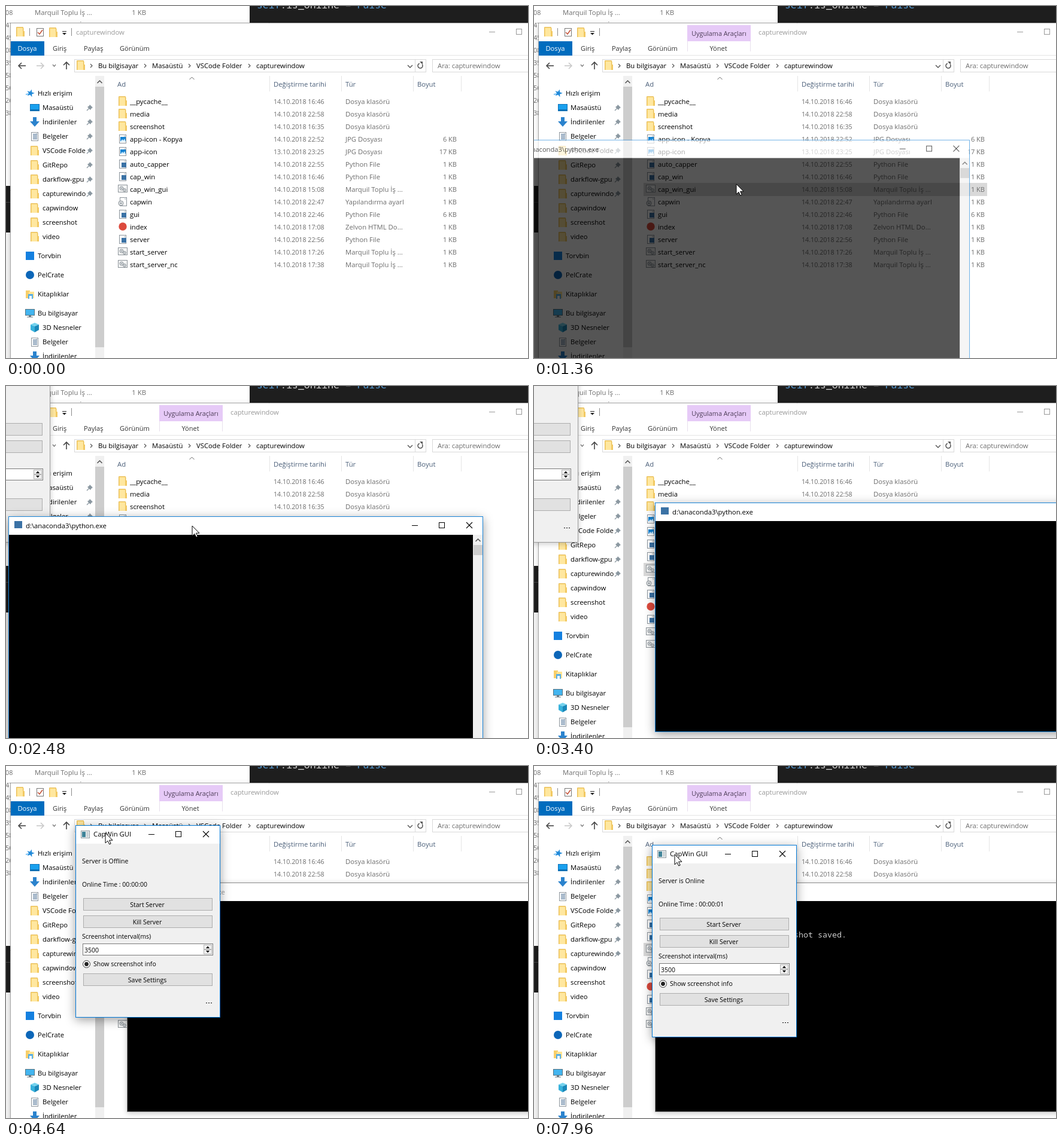
These frames come from a looping animation (872 by 589 pixels, 8 s). An HTML page with a canvas:

```html
<!DOCTYPE html>
<html lang="tr">
<head>
<meta charset="utf-8">
<title>CapWin GUI</title>
<style>
html, body { margin: 0; width: 100%; height: 100%; overflow: hidden; background: #fff; }
canvas { display: block; }
</style>
</head>
<body>
<canvas id="stage" width="872" height="589"></canvas>
<script>
const ctx = document.getElementById('stage').getContext('2d');
const W = 872, H = 589, LOOP = 8000, STEP = 40;
const SANS = '"Open Sans", "Noto Sans", sans-serif';
const MONO = '"Noto Sans Mono", "DejaVu Sans Mono", monospace';
const GRAY = '#6d6d6d', BLUE = '#0078d7';

// Pointer path: time, x, y
const PATH = [
  [200, 330, 600], [600, 345, 335], [760, 340, 287], [920, 338, 298], [1520, 338, 298],
  [2040, 248, 237], [2200, 248, 237], [2480, 311, 234], [2720, 509, 211], [3000, -118, -47],
  [3440, -118, -47], [4200, 123, 89], [4260, 123, 89], [4400, 166, 112], [4640, 166, 112],
  [4800, 247, 145], [5080, 247, 145], [5600, 298, 267], [6080, 298, 267], [6120, 296, 270],
  [6240, 298, 268], [6400, 298, 268], [6800, 533, 433], [7200, 533, 300], [7240, 533, 300],
  [7600, 170, 120], [7920, 235, 148]
];

const BAT = 'Marquil Toplu İş ...', PY = 'Python File', DIR = 'Dosya klasörü', JPG = 'JPG Dosyası';
const FILES = [
  ['folder', '__pycache__', '14.10.2018 16:46', DIR, ''],
  ['folder', 'media', '14.10.2018 22:58', DIR, ''],
  ['folder', 'screenshot', '14.10.2018 16:35', DIR, ''],
  ['image', 'app-icon - Kopya', '14.10.2018 22:52', JPG, '6 KB'],
  ['image', 'app-icon', '13.10.2018 23:25', JPG, '17 KB'],
  ['script', 'auto_capper', '14.10.2018 22:55', PY, '1 KB'],
  ['script', 'cap_win', '14.10.2018 16:46', PY, '1 KB'],
  ['batch', 'cap_win_gui', '14.10.2018 15:08', BAT, '1 KB'],
  ['config', 'capwin', '14.10.2018 22:47', 'Yapılandırma ayarl', '1 KB'],
  ['script', 'gui', '14.10.2018 22:46', PY, '6 KB'],
  ['web', 'index', '14.10.2018 17:08', 'Zelvon HTML Do...', '1 KB'],
  ['script', 'server', '14.10.2018 22:56', PY, '1 KB'],
  ['batch', 'start_server', '14.10.2018 17:26', BAT, '1 KB'],
  ['batch', 'start_server_nc', '14.10.2018 17:38', BAT, '1 KB']
];
const CHOSEN = 7;

// icon, label, row centre, level, pinned
const PLACES = [
  ['star', 'Hızlı erişim', 146, 0], ['desktop', 'Masaüstü', 170, 1, 1],
  ['down', 'İndirilenler', 194, 1, 1], ['doc', 'Belgeler', 218, 1, 1],
  ['folder', 'VSCode Folder', 242, 1, 1], ['folder', 'GitRepo', 266, 1, 1],
  ['folder', 'darkflow-gpu', 290, 1, 1], ['folder', 'capturewindow', 314, 1, 1],
  ['folder', 'capwindow', 338, 1], ['folder', 'screenshot', 362, 1], ['folder', 'video', 386, 1],
  ['square', 'Torvbin', 418, 0], ['disc', 'PelCrate', 450, 0], ['library', 'Kitaplıklar', 482, 0],
  ['pc', 'Bu bilgisayar', 514, 0], ['cube', '3D Nesneler', 538, 1],
  ['doc', 'Belgeler', 562, 1], ['down', 'İndirilenler', 586, 1]
];

function rect(x, y, w, h, fill, stroke) {
  if (fill) { ctx.fillStyle = fill; ctx.fillRect(x, y, w, h); }
  if (stroke) {
    ctx.strokeStyle = stroke; ctx.lineWidth = 1;
    ctx.strokeRect(x + .5, y + .5, w - 1, h - 1);
  }
}
function trace(pts) {
  ctx.beginPath();
  for (let i = 0; i < pts.length; i += 2) ctx.lineTo(pts[i], pts[i + 1]);
}
function line(color, width, ...pts) {
  trace(pts); ctx.strokeStyle = color; ctx.lineWidth = width; ctx.stroke();
}
function poly(color, ...pts) { trace(pts); ctx.fillStyle = color; ctx.fill(); }
function circle(x, y, r, fill, stroke) {
  ctx.beginPath(); ctx.arc(x, y, r, 0, 7);
  if (fill) { ctx.fillStyle = fill; ctx.fill(); }
  if (stroke) { ctx.strokeStyle = stroke; ctx.lineWidth = 1; ctx.stroke(); }
}
function text(s, x, mid, color = '#000', size = 11.3, align = 'left', family = SANS) {
  ctx.font = `${size}px ${family}`;
  ctx.textAlign = align; ctx.fillStyle = color;
  ctx.fillText(s, x, mid + 4);
}
function clipped(x, y, w, h, draw) {
  ctx.save(); ctx.beginPath(); ctx.rect(x, y, w, h); ctx.clip(); draw(); ctx.restore();
}
function shadowed(x, y, w, h, fill, strong) {
  ctx.save();
  ctx.shadowColor = `rgba(0,0,0,${strong ? .38 : .22})`;
  ctx.shadowBlur = strong ? 16 : 9; ctx.shadowOffsetY = strong ? 4 : 2;
  rect(x, y, w, h, fill);
  ctx.restore();
}

function page(x, y) {
  rect(x - 6, y - 7, 12, 15, '#fff', '#8d959c');
  poly('#d5dadd', x + 2, y - 7, x + 6, y - 3, x + 2, y - 3);
}
function gear(x, y, r) {
  circle(x, y, r, '#dfe3e5', '#8a9197'); circle(x, y, r / 3, '#8a9197');
}
// Each icon is drawn around its centre
const ICONS = {
  folder(x, y) {
    rect(x - 6, y - 7, 10, 15, '#fbd775');
    rect(x - 5, y - 6, 11, 14, '#ffe79f');
    rect(x + 4, y - 1, 3, 9, '#f2c963');
    line('#e6bd5b', 1, x - 6.5, y + 8, x - 6.5, y - 7.5, x + 4.5, y - 7.5, x + 4.5, y - 1);
  },
  image(x, y) {
    page(x, y); rect(x - 4, y - 3, 9, 8, '#1583d2');
    poly('#d9efff', x - 4, y + 5, x - 1, y + 1, x + 1, y + 3, x + 3, y, x + 5, y + 5);
  },
  script(x, y) { page(x, y); rect(x - 2, y - 2, 8, 8, '#3b72a5'); },
  batch(x, y) {
    rect(x - 8, y - 7, 16, 13, '#f4f5f5', '#8b9298');
    gear(x - 2, y - 1, 3); gear(x + 3, y + 2, 2.5);
  },
  config(x, y) { page(x + 1, y); gear(x - 3, y + 3, 4); },
  web(x, y) { circle(x, y, 6.7, '#dc4a3d'); },
  star(x, y) {
    line('#7bc2f5', 2, x - 7, y + 2, x - 2, y + 1);
    ctx.beginPath();
    for (let i = 0; i < 10; i++) {
      const a = i * Math.PI / 5 - 1.3, r = i % 2 ? 2.7 : 6.8;
      ctx.lineTo(x + 1 + r * Math.cos(a), y + r * Math.sin(a));
    }
    ctx.fillStyle = '#2089d9'; ctx.fill();
  },
  desktop(x, y) { rect(x - 8, y - 6, 16, 12, '#19a0ee', '#1173b8'); rect(x - 7, y + 3, 14, 2, '#0c6fb4'); },
  down(x, y) { poly('#2b83cd', x - 3, y - 8, x + 3, y - 8, x + 3, y - 1, x + 8, y - 1, x, y + 8, x - 8, y - 1, x - 3, y - 1); },
  doc(x, y) {
    page(x, y);
    for (let i = -4; i < 6; i += 2) line('#58799b', 1, x - 3, y + i + .5, x + 4, y + i + .5);
  },
  square(x, y) { rect(x - 7, y - 7, 14, 14, '#1480e0'); },
  disc(x, y) { circle(x, y, 7, '#0c66b8'); },
  library(x, y) {
    rect(x - 7, y - 6, 7, 13, '#f8cf69'); rect(x - 2, y - 4, 9, 11, '#ffe493');
    rect(x - 3, y, 8, 8, '#56ade5'); rect(x - 1, y + 3, 4, 5, '#fff');
  },
  pc(x, y) {
    rect(x - 8, y - 7, 16, 11, '#43b5ef', '#58727f');
    rect(x - 2, y + 4, 4, 2, '#73838c'); rect(x - 5, y + 6, 10, 1, '#73838c');
  },
  cube(x, y) {
    poly('#76d3ee', x - 7, y - 5, x, y - 8, x + 7, y - 5, x, y - 2);
    poly('#38b2dc', x - 7, y - 5, x, y - 2, x, y + 8, x - 7, y + 4);
    poly('#1a88b9', x + 7, y - 5, x, y - 2, x, y + 8, x + 7, y + 4);
  }
};

function pin(x, y) {
  poly('#8b98a1', x, y - 5, x + 5, y, x + 3, y + 1, x + 1, y + 4, x - 4, y - 1, x - 1, y - 3);
  line('#8b98a1', 1.2, x - 1, y + 1, x - 5, y + 5);
}
function captionButtons(minX, maxX, closeX, mid, color) {
  rect(minX, mid, 10, 1, color);
  rect(maxX, mid - 5, 10, 10, null, color);
  if (closeX === undefined) return;
  line(color, 1.1, closeX, mid - 5, closeX + 10, mid + 5);
  line(color, 1.1, closeX + 10, mid - 5, closeX, mid + 5);
}
const chevronRight = x => line('#555', 1.2, x - 2, 97, x + 1, 100, x - 2, 103);
const chevronUp = (x, y) => line('#505050', 1.5, x - 4, y + 2, x, y - 2, x + 4, y + 2);
function arrow(x, y, dx, dy, color) {
  line(color, 1.6, x - dx * 6, y - dy * 6, x + dx * 5.5, y + dy * 5.5);
  line(color, 1.6, x + dx - dy * 5, y + dy - dx * 5, x + dx * 6, y + dy * 6, x + dx + dy * 5, y + dy + dx * 5);
}

function drawBackdrop() {
  rect(0, 0, W, H, '#fff');
  ['08', '47', '45', '08', '35', '58', '56', '26', '38'].forEach((s, i) => text(s, -1, 11 + i * 21, GRAY, 10.8));
  for (const y of [11, 32]) {
    text(BAT, 48, y, GRAY); text('1 KB', 234, y, GRAY, 11.3, 'right');
  }
  rect(407, 0, 465, 29, '#1e1e1e');
  const code = 16.43;
  text('self', 419, 0, '#569cd6', code, 'left', MONO);
  text('.is_online = ', 419 + 39.4, 0, '#d4d4d4', code, 'left', MONO);
  text('False', 419 + 167.6, 0, '#569cd6', code, 'left', MONO);
  rect(0, 301, 8, 78, '#1e1e1e');
  rect(0, 328, 8, 1, '#454545');
  rect(0, 379, 8, 210, '#f4f4f4');
}

function drawExplorer(t, mouse) {
  const opened = t >= 1040, active = opened && t < 1280;
  const caption = active ? '#000' : '#999';
  shadowed(8, 29, 880, 580, '#fff', active);
  line(active ? '#4a4a4a' : '#a6a6a6', 1, 7.5, H, 7.5, 28.5, W, 28.5);

  ICONS.folder(24, 43); rect(39, 37, 1, 13, '#8a8a8a');
  rect(51, 37, 12, 14, '#fff', '#777'); line('#c4563d', 1.6, 53, 44, 56, 47, 61, 40);
  ICONS.folder(79, 44);
  rect(94, 42, 7, 1, '#222'); poly('#222', 94, 45, 101, 45, 97.5, 48.5);
  rect(109, 37, 1, 13, '#8a8a8a');
  text('capturewindow', opened ? 375 : 117, 44, caption);
  captionButtons(807, 852, undefined, 43, caption);

  rect(8, 59, 56, 24, '#006cbe');
  text('Dosya', 35.5, 71, '#fff', 11.2, 'center');
  text('Giriş', 78, 71, '#333', 11); text('Paylaş', 130, 71, '#333', 11);
  text('Görünüm', 190, 71, '#333', 11);
  if (opened) {
    rect(256, 32, 106, 27, '#e6caf7');
    text('Uygulama Araçları', 309, 46, '#4d3d57', 10.8, 'center');
    rect(256, 59, 1, 17, '#e8e0ed'); rect(361, 59, 1, 17, '#e8e0ed');
    text('Yönet', 308, 71, '#333', 11, 'center');
  }
  rect(64, 82, 808, 1, '#e4e4e4');

  arrow(27, 100, -1, 0, '#444'); arrow(57, 100, 1, 0, '#c9c9c9'); arrow(101, 100, 0, -1, '#444');
  line('#777', 1.2, 78, 98, 80.5, 101, 83, 98);
  rect(114, 89, 588, 22, '#fff', '#d9d9d9'); rect(683, 90, 1, 20, '#d9d9d9');
  ICONS.folder(125, 99);
  [143, 233, 307, 407].forEach(chevronRight);
  text('Bu bilgisayar', 154, 100); text('Masaüstü', 244, 100);
  text('VSCode Folder', 318, 100); text('capturewindow', 418, 100);
  line('#555', 1.4, 671, 99, 675, 103, 679, 99);
  ctx.beginPath(); ctx.arc(692, 100, 4, -.6, 4.4);
  ctx.strokeStyle = '#555'; ctx.lineWidth = 1.5; ctx.stroke();
  poly('#555', 691, 93, 696, 93, 696, 98);
  rect(712, 89, 180, 22, '#fff', '#d9d9d9');
  text('Ara: capturewindow', 721, 100, GRAY);

  for (const [icon, label, y, level, pinned] of PLACES) {
    ICONS[icon](level ? 48 : 40, y);
    clipped(50, y - 12, pinned ? 83 : 98, 24, () => text(label, level ? 61 : 53, y));
    if (pinned) pin(140, y);
  }
  rect(149, 117, 15, 472, '#f0f0f0'); rect(149, 135, 15, 436, '#cdcdcd');
  chevronUp(156.5, 127);

  line('#666', 1, 306.5, 123, 310.5, 119, 314.5, 123);
  [['Ad', 186], ['Değiştirme tarihi', 447], ['Tür', 567], ['Boyut', 687]].forEach(h => text(h[0], h[1], 131, '#4c607a'));
  [440, 560, 680, 760].forEach(x => rect(x, 117, 1, 26, '#e5e5e5'));

  const hover = t < 1280 ? Math.floor((mouse.y - 149) / 21) : -1;
  FILES.forEach(([icon, name, date, kind, size], i) => {
    const y = 160 + i * 21;
    if (opened && i === CHOSEN) rect(183, y - 11, 574, 22, active ? '#cce8ff' : '#d9d9d9');
    else if (i === hover) rect(183, y - 11, 574, 22, '#e5f3ff');
    ICONS[icon](195, y - 1);
    text(name, 207, y); text(date, 447, y, GRAY, 10.7);
    text(kind, 567, y, GRAY); text(size, 753, y, GRAY, 11, 'right');
  });
}

// Fade and grow from the centre of the box
function appear(p, x, y, w, h, draw) {
  if (p <= 0) return;
  const scale = .955 + .045 * p;
  ctx.save();
  ctx.globalAlpha = p;
  ctx.translate(x + w / 2, y + h / 2); ctx.scale(scale, scale); ctx.translate(-w / 2, -h / 2);
  draw();
  ctx.restore();
}

function drawConsole(t, active, opening) {
  const w = 793, h = 384, caption = active ? '#000' : '#999';
  if (opening) line('#1883d7', 1, .5, h, .5, .5, w - .5, .5, w - .5, h);
  else shadowed(0, 0, w, h, '#fff', active);
  rect(1, 1, w - 2, 30, '#fff');
  rect(1, 31, w - 18, h - 32, '#000');
  rect(w - 17, 31, 16, h - 32, '#f0f0f0'); rect(w - 16, 48, 15, 17, '#cdcdcd');
  chevronUp(w - 8.5, 40);
  rect(10, 8, 13, 12, '#3b72a5');
  text('d:\\anaconda3\\python.exe', 29, 16, caption);
  captionButtons(674, 719, 765, 15, caption);
  if (t >= 6600) text('Screenshot saved.', 184, 88, '#ccc', 13.33, 'left', MONO);
  if (!opening) rect(0, 0, w, h, null, active ? '#1883d7' : '#8c8c8c');
}

function drawDialog(t, active) {
  const w = 242, h = 322, caption = active ? '#000' : '#999';
  const label = (s, x, mid) => text(s, x, mid, '#000', 10.5);
  const button = (s, y, fill = '#e1e1e1', edge = '#adadad') => {
    rect(13, y, 216, 21, fill, edge);
    text(s, 120, y + 11, '#000', 10.5, 'center');
  };
  shadowed(0, 0, w, h, '#f0f0f0', active);
  rect(0, 0, w, 31, '#fff');
  rect(9, 9, 15, 13, '#f2f5f6', '#8c979d'); rect(11, 11, 6, 9, '#3f8398'); rect(18, 11, 4, 9, '#cbd3d6');
  text('CapWin GUI', 30, 15, caption);
  captionButtons(122, 167, 213, 15, caption);

  const online = t >= 6520;
  label(online ? 'Server is Online' : 'Server is Offline', 11, 60);
  label('Online Time : 00:00:0' + (t >= 7520 ? 1 : 0), 11, 99);
  if (t >= 6400 && t < 6480) button('Start Server', 122, '#cce4f7', '#005499');
  else if (t >= 5560 && t < 6520) button('Start Server', 122, '#e5f1fb', BLUE);
  else button('Start Server', 122);
  button('Kill Server', 151);
  label('Screenshot interval(ms)', 11, 186);
  rect(12, 198, 218, 20, '#fff', '#7a7a7a');
  label('3500', 15, 209);
  rect(214, 200, 14, 8, '#f0f0f0', '#b5b5b5'); rect(214, 208, 14, 8, '#f0f0f0', '#b5b5b5');
  poly('#000', 218, 206, 224, 206, 221, 202.5); poly('#000', 218, 210, 224, 210, 221, 213.5);
  circle(18.5, 232.5, 6, '#fff', '#333'); circle(18.5, 232.5, 3.4, '#222');
  label('Show screenshot info', 30, 232);
  button('Save Settings', 248);
  [218, 222, 226].forEach(x => rect(x, 297, 2, 1, '#000'));
  rect(0, 0, w, h, null, active ? BLUE : '#9b9b9b');
}

function drawPointer({ x, y }) {
  trace([x, y, x, y + 17, x + 4, y + 13.3, x + 6.7, y + 19, x + 9.2, y + 18, x + 6.6, y + 12.2, x + 12, y + 12.2]);
  ctx.closePath();
  ctx.fillStyle = '#fff'; ctx.fill();
  ctx.strokeStyle = '#000'; ctx.lineWidth = 1; ctx.stroke();
}

const clamp = (v, lo, hi) => Math.min(hi, Math.max(lo, v));
function pointerAt(t) {
  t = clamp(t, PATH[0][0], PATH[PATH.length - 1][0]);
  const i = Math.max(1, PATH.findIndex(k => k[0] >= t));
  const [t0, x0, y0] = PATH[i - 1], [t1, x1, y1] = PATH[i];
  const p = (t - t0) / (t1 - t0);
  return { x: Math.round(x0 + (x1 - x0) * p), y: Math.round(y0 + (y1 - y0) * p) };
}

function render(t) {
  const mouse = pointerAt(t);
  drawBackdrop();
  drawExplorer(t, mouse);

  // A dragged box keeps its offset from the pointer
  const grabConsole = pointerAt(clamp(t, 2200, 2720));
  const grabDialog = pointerAt(clamp(t, 3440, 4800));
  const consoleIn = clamp((t - 1240) / 180, 0, 1), dialogIn = clamp((t - 1760) / 160, 0, 1);
  const dialogFront = t < 2200 || t >= 3440;
  const terminal = () => appear(consoleIn, grabConsole.x - 307, grabConsole.y - 16, 793, 384,
    () => drawConsole(t, t < 1760 || !dialogFront, consoleIn < 1));
  const dialog = () => appear(dialogIn, grabDialog.x - 50, grabDialog.y - 13, 242, 322,
    () => drawDialog(t, dialogFront));
  (dialogFront ? [terminal, dialog] : [dialog, terminal]).forEach(draw => draw());
  drawPointer(mouse);
}

let shown = -1;
const start = performance.now();
function tick() {
  const t = Math.floor((performance.now() - start) % LOOP / STEP) * STEP;
  if (t !== shown) { shown = t; render(t); }
  requestAnimationFrame(tick);
}
tick();
</script>
</body>
</html>
```
